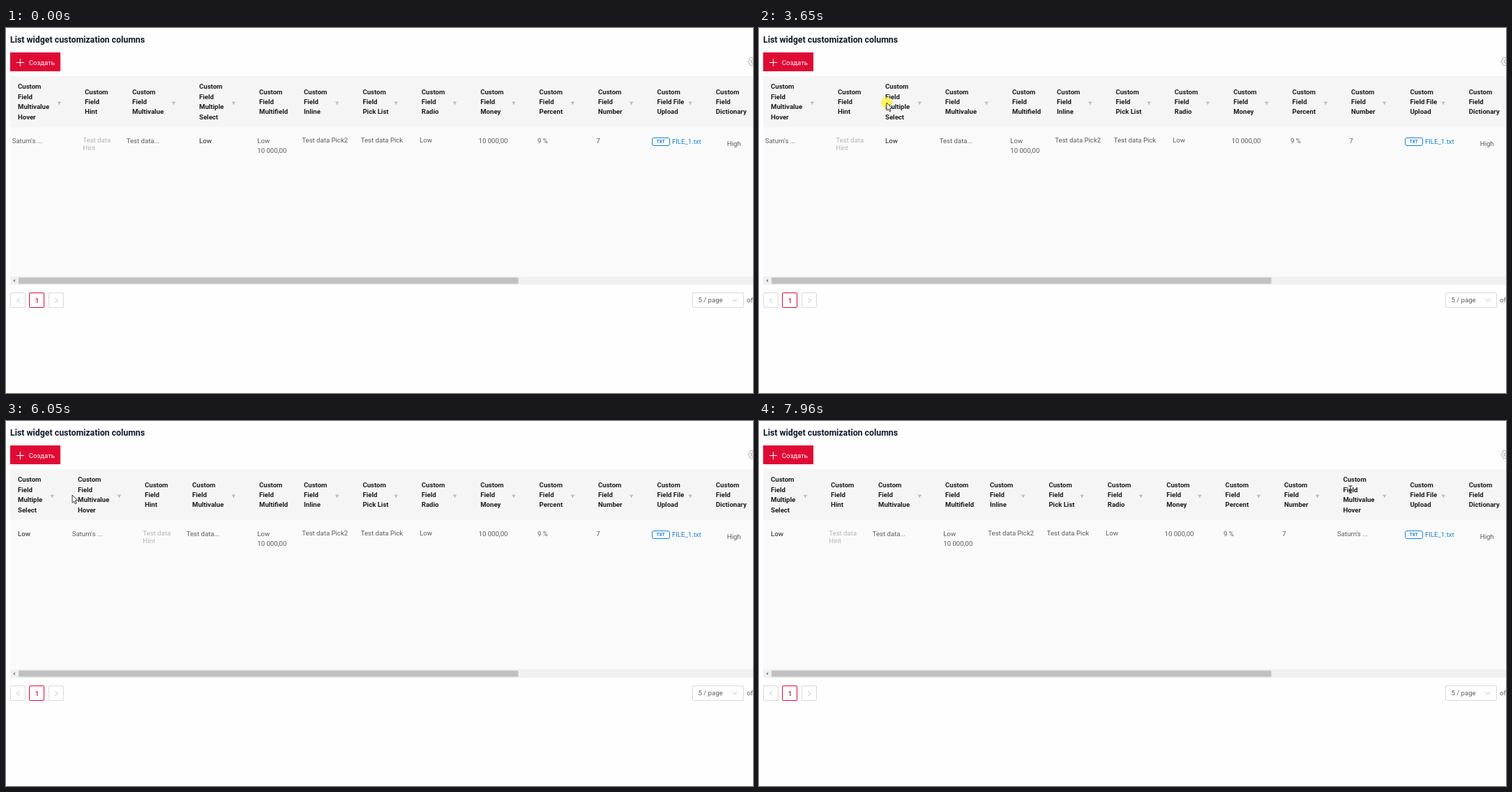
These frames come from a looping animation (1071x523 px, 8000 ms). An HTML page with a canvas:

```html
<!DOCTYPE html>
<html lang="en">
<head>
<meta charset="utf-8">
<title>List widget</title>
<style>
html, body { margin: 0; width: 100%; height: 100%; overflow: hidden; background: #fefefe; }
canvas { display: block; width: 1071px; height: 523px; }
</style>
</head>
<body>
<canvas id="stage"></canvas>
<script>
const W = 1071, H = 523, LOOP = 8000;
const canvas = document.getElementById('stage');
const ctx = canvas.getContext('2d');
const dpr = window.devicePixelRatio || 1;
canvas.width = W * dpr;
canvas.height = H * dpr;

const INK = '#1d1d1f', BODY = '#5c5c5c', PALE = '#b4b4b4', GREY = '#c4c4c4';
const RED = '#e00b35', BLUE = '#1a7fd9';
const LEFT = 6, TOP = 69, BOTTOM = 142, HEAD_H = BOTTOM - TOP;
const PITCH = 14.4, ROW = 162, HIGH_ROW = 160.5;

const col = (title, cell, opts) => ({
  lines: ('Custom|' + title).split('|'), cell: cell.split('|'),
  w: 84.4, dx: 8.3, y: ROW, step: 14, color: BODY, filter: true, ...opts
});
const wide = { w: 96, dx: 2.7 }, high = { y: HIGH_ROW };
const cols = {
  hover: col('Field|Multivalue|Hover', "Saturn's ...", wide),
  hint: col('Field|Hint', 'Test data|Hint', { ...high, w: 68, step: 11, color: PALE, filter: false }),
  multi: col('Field|Multivalue', 'Test data...', wide),
  select: col('Field|Multiple|Select', 'Low', { w: 86, dx: 11, color: INK }),
  field: col('Field|Multifield', 'Low|10 000,00', { w: 64, filter: false }),
  inline: col('Field|Inline', 'Test data Pick2', high),
  pick: col('Field|Pick List', 'Test data Pick', high),
  radio: col('Field|Radio', 'Low', high),
  money: col('Field|Money', '10 000,00'),
  percent: col('Field|Percent', '9 %'),
  number: col('Field|Number', '7'),
  file: col('Field File|Upload', 'FILE_1.txt', { dx: 32.5, y: 163, color: BLUE }),
  dict: col('Field|Dictionary', 'High', { dx: 27, y: 166, filter: false })
};

// press, drag start, release and reorder times; ax, ay: grab point
const drags = [
  { key: 'select', before: 'multi', press: 1680, start: 1910, release: 2500, drop: 2540, ax: 313, ay: 90 },
  { key: 'select', before: 'hover', press: 3650, start: 3850, release: 4360, drop: 4750, ax: 189.5, ay: 110 },
  { key: 'hover', before: 'file', press: 6360, start: 6530, release: 7460, drop: 7720, ax: 145, ay: 106 }
];
const HIDE = 7460, BEAM = 7960;

// pointer moves: from, to (ms), then the point reached; it rests in between
const ENTER = { x: 1062, y: 500 };
const moves = [
  [60, 560, 237, 75], [560, 770, 301, 80], [900, 1250, 313, 90],
  [1910, 1970, 291, 95], [2180, 2400, 224, 101], [2540, 2710, 229, 97],
  [2840, 3650, 183, 107], [3850, 4190, 105.5, 107], [4190, 4360, 40, 101],
  [4750, 5020, 74, 120.5], [5020, 5480, 1057, 187], [5570, 6050, 95, 106],
  [6270, 6360, 126, 111], [6530, 6860, 480, 109], [6860, 7330, 848, 98]
];

function pointer(t) {
  let { x, y } = ENTER;
  for (const [from, to, tx, ty] of moves) {
    const k = Math.min(1, Math.max(0, (t - from) / (to - from)));
    x += (tx - x) * k;
    y += (ty - y) * k;
  }
  return { x, y };
}

function layout(t) {
  let keys = Object.keys(cols);
  for (const d of drags.filter(d => t >= d.drop)) {
    keys = keys.filter(k => k !== d.key);
    keys.splice(keys.indexOf(d.before), 0, d.key);
  }
  let x = LEFT;
  return keys.map(key => {
    const slot = { key, x, end: x + cols[key].w };
    x = slot.end;
    return slot;
  });
}

function text(s, x, mid, color, size = 9.6, weight = 400, align = 'left') {
  ctx.font = `${weight} ${size}px Roboto, sans-serif`;
  ctx.textAlign = align;
  ctx.fillStyle = color;
  ctx.fillText(s, x, Math.round(mid + size * 0.36));
}

function rect(x, y, w, h, color) {
  ctx.fillStyle = color;
  ctx.fillRect(x, y, w, h);
}

function box(x, y, w, h, r, color, fill) {
  ctx.beginPath();
  ctx.roundRect(x, y, w, h, r);
  ctx.fillStyle = fill;
  ctx.fill();
  stroke(color);
}

function stroke(color, width = 1) {
  ctx.strokeStyle = color;
  ctx.lineWidth = width;
  ctx.stroke();
}

function trace(pts, x = 0, y = 0) {
  ctx.beginPath();
  for (const [px, py] of pts) ctx.lineTo(x + px, y + py);
}

function line(x0, y0, x1, y1, color, width) {
  trace([[x0, y0], [x1, y1]]);
  stroke(color, width);
}

function chevron(x, y, angle) {
  ctx.save();
  ctx.translate(x, y);
  ctx.rotate(angle);
  trace([[-2, -3.2], [2, 0], [-2, 3.2]]);
  stroke(GREY);
  ctx.restore();
}

function filterIcon(x, y) {
  rect(x - 2.5, y - 2, 5, 1, '#b0b0b0');
  trace([[-2, -1], [2, -1], [0.6, 0.5], [0.6, 2.4], [-0.6, 2.4], [-0.6, 0.5]], x, y);
  ctx.fillStyle = '#b0b0b0';
  ctx.fill();
}

function gear(x, y) {
  ctx.beginPath();
  for (let a = 0; a < 6.3; a += 0.1) {
    const r = 5.7 + 0.7 * Math.cos(a * 6);
    ctx.lineTo(x + r * Math.cos(a), y + r * Math.sin(a));
  }
  stroke('#999');
  ctx.beginPath();
  ctx.arc(x, y, 2.3, 0, 7);
  stroke('#999');
}

function header(c, x, y = 0) {
  const first = 105.6 - (c.lines.length - 1) * PITCH / 2 + y;
  c.lines.forEach((s, i) => text(s, x + 11, first + i * PITCH, INK, 9.6, 700));
  if (c.filter) filterIcon(x + c.w - 25.7, 107.7 + y);
}

function cell(c, x) {
  c.cell.forEach((s, i) => text(s, x + c.dx, c.y + i * c.step, c.color));
  if (c === cols.file) {
    box(Math.floor(x + 4) + 0.5, 157.5, 25, 11, 2.5, BLUE, '#fff');
    text('TXT', x + 16.4, 163, BLUE, 6.4, 700, 'center');
  }
}

function page() {
  rect(0, 0, W, H, '#fefefe');
  text('List widget customization columns', LEFT, 17, '#101828', 12.34, 700);
  rect(LEFT, 35, 72, 27, RED);
  line(15, 49.5, 26, 49.5, '#fff');
  line(20.5, 44, 20.5, 55, '#fff');
  text('Создать', 32.7, 49.3, '#fff');
  gear(1070.5, 48);

  rect(LEFT, TOP, W, HEAD_H, '#f5f5f5');
  rect(LEFT, BOTTOM, W, 214, '#fafafa');
  rect(LEFT, 356, W, 12, '#f1f1f1');
  rect(18, 357.5, 716.5, 9, '#c1c1c1');
  trace([[10, 362], [13, 359.7], [13, 364.3]]);
  ctx.fillStyle = '#8c8c8c';
  ctx.fill();

  for (let i = 0; i < 3; i++) {
    box(Math.floor(27.5 * i) + 6.5, 379.5, 21, 21, 1.5, i === 1 ? RED : '#d9d9d9', '#fff');
  }
  chevron(17.3, 390.5, Math.PI);
  text('1', 44.5, 390.2, RED, 9.6, 500, 'center');
  chevron(72.3, 390.5, 0);
  box(984.5, 379.5, 73, 21, 1.5, '#d9d9d9', '#fff');
  text('5 / page', 992.5, 389.6, BODY);
  chevron(1045, 390, Math.PI / 2);
  text('of', 1062, 389.6, BODY);
}

function dropLine(at) {
  const x = Math.floor(at) + 0.5;
  ctx.setLineDash([4, 2.6]);
  line(x, TOP, x, BOTTOM, '#f0a098');
  ctx.setLineDash([]);
  line(x, TOP, x, TOP + 3, '#a33');
}

function arrow(x, y) {
  trace([[0, 0], [0, 11.3], [2.6, 9], [4.3, 12.8], [6, 12], [4.4, 8.2], [7.8, 8]], x, y);
  ctx.closePath();
  ctx.fillStyle = '#fff';
  ctx.fill();
  stroke('#222', 0.9);
}

function beam(x, y) {
  for (const side of [-5, 5]) line(x - 2.5, y + side, x + 2.5, y + side, '#222');
  line(x, y - 5, x, y + 5, '#222');
}

function ghost(c, x, y) {
  ctx.globalAlpha = 0.7;
  rect(x, TOP + y, c.w, HEAD_H, '#f7f7f7');
  header(c, x, y);
  ctx.globalAlpha = 1;
}

function draw(t) {
  ctx.setTransform(dpr, 0, 0, dpr, 0, 0);
  page();

  const slots = layout(t);
  for (const { key, x } of slots) {
    header(cols[key], x);
    cell(cols[key], x);
  }

  const p = pointer(t);
  const d = drags.find(d => t >= d.press && t < d.drop);
  const moving = d && t >= d.start;
  const held = d && t < d.release;

  if (moving) {
    const own = slots.find(s => s.key === d.key);
    const over = slots.find(s => p.x < s.end);
    if (held) ghost(cols[d.key], own.x + p.x - d.ax, p.y - d.ay);
    if (over !== own) dropLine(over.x < own.x ? over.x : over.end);
  }
  if (held) {
    ctx.beginPath();
    ctx.arc(p.x, p.y, 8, 0, 7);
    ctx.fillStyle = 'rgba(252,243,50,.75)';
    ctx.fill();
  }
  if (t >= BEAM) beam(p.x, p.y);
  else if (t >= 60 && t < HIDE && (!d || held)) {
    arrow(p.x, p.y);
    if (moving) box(p.x + 2.5, p.y + 12, 7.5, 5.5, 0, '#555', '#eee');
  }
}

const start = performance.now();
function tick() {
  draw((performance.now() - start) % LOOP);
  requestAnimationFrame(tick);
}
tick();
</script>
</body>
</html>
```
